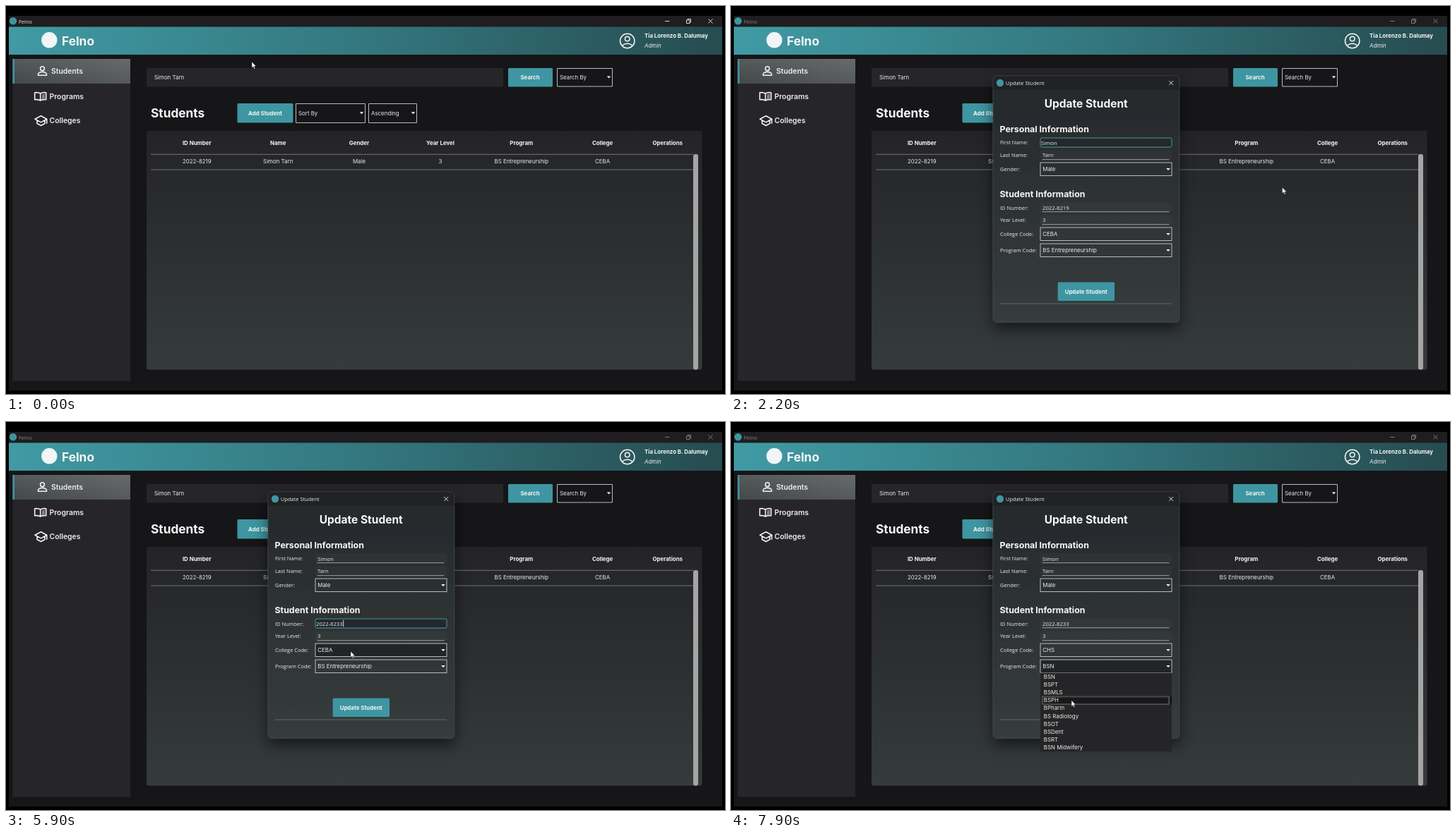
Recreate the animation shown at these times as an HTML page. Size 1018 px wide and 550 px high, loop 8000 ms.

```html
<!DOCTYPE html>
<html lang="en">
<head>
<meta charset="utf-8">
<title>Student records</title>
<style>
html, body { margin: 0; width: 100%; height: 100%; overflow: hidden; background: #000; }
svg { display: block; width: 1018px; height: 550px; }
text { font: 7.9px Inter, sans-serif; fill: #ececec; white-space: pre; }
.ui text, text.ui { font: 7.45px "Open Sans", "Noto Sans", sans-serif; }
.edit text { font: 7.7px "Open Sans", "Noto Sans", sans-serif; }
.bold text, text.bold { font-weight: 700; fill: #f4f4f4; }
.mid text, text.mid { text-anchor: middle; }
.nav text { font-size: 10.4px; font-weight: 600; }
text.h1 { font-size: 17.3px; font-weight: 700; fill: #f6f6f6; }
text.h2 { font-size: 15.5px; font-weight: 700; fill: #f6f6f6; }
text.h3 { font-size: 12.4px; font-weight: 700; fill: #f6f6f6; }
.icon { fill: none; stroke: #f0f0f0; stroke-width: 1.6; stroke-linejoin: round; }
.box { fill: none; stroke: #b9bcbc; stroke-width: 1; }
.teal { fill: #3d96a1; }
.focus rect { fill: #25282a; stroke: #3f97a2; }
.caret { fill: #fff; }
.hover { fill: #232426; }

/* Every animation shares one 8 s clock. */
.dim, .dialog, .first, .firstText, .firstCaret, .year, .id, .idText, .idCaret,
.one, .nine, .three, .last, .before, .after, .hoverA, .hoverB, .listA, .listB,
.rollA, .rollB, .pickA, .pickB, .cursor, .arrow, .beam {
  animation: 8s step-end infinite;
}
.dim { animation-name: dim; }
@keyframes dim { 0% { opacity: 1 } 18.13%, 100% { opacity: .5 } }

.dialog { animation-name: open; animation-timing-function: linear; transform-origin: 502.7px 274px; }
@keyframes open {
  0%, 18.13% { opacity: 0; transform: scale(.9); animation-timing-function: ease-out }
  19.5% { opacity: 1; transform: scale(.972); animation-timing-function: ease-out }
  21.25%, 100% { opacity: 1; transform: none }
}

.first { animation-name: first; }
@keyframes first { 0% { opacity: 1 } 44.38%, 100% { opacity: 0 } }
.firstText { animation-name: firstText; }
@keyframes firstText { 0% { transform: translateX(-2px) } 44.38%, 100% { transform: none } }
.firstCaret { animation-name: firstCaret; }
@keyframes firstCaret { 0% { opacity: 1 } 25.38% { opacity: 0 } 32% { opacity: 1 } 38.63%, 100% { opacity: 0 } }

.year { animation-name: year; }
@keyframes year { 0% { opacity: 0 } 36.9% { opacity: 1 } 40.6% { opacity: 0 } 69.8% { opacity: 1 } 71.3%, 100% { opacity: 0 } }

.id { animation-name: id; }
@keyframes id { 0% { opacity: 0 } 44.38% { opacity: 1 } 75.63%, 100% { opacity: 0 } }
.idText { animation-name: idText; }
@keyframes idText { 0% { transform: none } 44.38% { transform: translateX(-2px) } 75.63%, 100% { transform: none } }
.idCaret { animation-name: idCaret; }
@keyframes idCaret {
  0% { opacity: 0; transform: none }
  44.38% { opacity: 1; transform: none }
  51% { opacity: 0; transform: none }
  57.5% { opacity: 1; transform: translateX(-4.4px) }
  60% { opacity: 1; transform: translateX(-8.8px) }
  65.63% { opacity: 1; transform: translateX(-4.4px) }
  67.5% { opacity: 1; transform: none }
  74.13%, 100% { opacity: 0; transform: none }
}
.nine { animation-name: nine; }
@keyframes nine { 0% { fill-opacity: 1 } 57.5%, 100% { fill-opacity: 0 } }
.one { animation-name: one; }
@keyframes one { 0% { fill-opacity: 1 } 60%, 100% { fill-opacity: 0 } }
.three { animation-name: three; }
@keyframes three { 0% { fill-opacity: 0 } 65.63%, 100% { fill-opacity: 1 } }
.last { animation-name: last; }
@keyframes last { 0% { fill-opacity: 0 } 67.5%, 100% { fill-opacity: 1 } }

.before { animation-name: before; }
@keyframes before { 0% { opacity: 1 } 81.88%, 100% { opacity: 0 } }
.after { animation-name: after; }
@keyframes after { 0% { opacity: 0 } 81.88%, 100% { opacity: 1 } }

.hoverA { animation-name: hoverA; }
@keyframes hoverA { 0% { opacity: 0 } 32.5% { opacity: 1 } 35% { opacity: 0 } 72% { opacity: 1 } 82.5%, 100% { opacity: 0 } }
.hoverB { animation-name: hoverB; }
@keyframes hoverB { 0% { opacity: 0 } 86% { opacity: 1 } 100% { opacity: 1 } }

.listA { animation-name: listA; }
@keyframes listA { 0% { opacity: 0 } 75.63% { opacity: 1 } 81.88%, 100% { opacity: 0 } }
.rollA { animation-name: rollA; animation-timing-function: linear; }
@keyframes rollA { 0%, 75.63% { transform: translateY(-79px) } 77.5%, 100% { transform: none } }
.pickA { animation-name: pickA; }
@keyframes pickA {
  0% { transform: none } 78.1% { transform: translateY(11.17px) }
  78.9% { transform: translateY(22.34px) } 79.8%, 100% { transform: translateY(33.5px) }
}
.listB { animation-name: listB; }
@keyframes listB { 0% { opacity: 0 } 89.56%, 100% { opacity: 1 } }
.rollB { animation-name: rollB; animation-timing-function: linear; }
@keyframes rollB { 0%, 89.56% { transform: translateY(-111.5px) } 91.44%, 100% { transform: none } }
.pickB { animation-name: pickB; }
@keyframes pickB {
  0% { transform: none } 93.2% { transform: translateY(11.17px) }
  94.5% { transform: translateY(22.34px) } 96%, 100% { transform: translateY(33.5px) }
}

.cursor { animation-name: move; animation-timing-function: ease-in-out; }
@keyframes move {
  0%, 1.25% { transform: translate(348px, 79px) }
  11.25%, 23.75% { transform: translate(912px, 216px) }
  33.1% { transform: translate(520px, 338px) }
  38.75% { transform: translate(476px, 302px) }
  43.75%, 68.75% { transform: translate(500px, 287px) }
  73.1%, 75.6% { transform: translate(488px, 325px) }
  80.6%, 82.5% { transform: translate(488px, 372px) }
  87.5% { transform: translate(487px, 347px) }
  90% { transform: translate(487px, 352px) }
  97.5%, 100% { transform: translate(482px, 394.5px) }
}
.arrow { animation-name: arrow; }
@keyframes arrow { 0% { opacity: 1 } 36.25% { opacity: 0 } 71.3%, 100% { opacity: 1 } }
.beam { animation-name: beam; }
@keyframes beam { 0% { opacity: 0 } 36.25% { opacity: 1 } 71.3%, 100% { opacity: 0 } }
</style>
</head>
<body>
<svg viewBox="0 0 1018 550" xmlns="http://www.w3.org/2000/svg">
  <defs>
    <linearGradient id="bar"><stop stop-color="#409aa4"/><stop offset=".5" stop-color="#34777f"/><stop offset="1" stop-color="#264c50"/></linearGradient>
    <linearGradient id="active" x1="0" y1="1" x2="1" y2="0"><stop stop-color="#434849"/><stop offset="1" stop-color="#676b6b"/></linearGradient>
    <linearGradient id="panel" x2="0" y2="1"><stop stop-color="#242427"/><stop offset="1" stop-color="#353b3b"/></linearGradient>
    <linearGradient id="sheet" x2="0" y2="1"><stop stop-color="#25282a"/><stop offset="1" stop-color="#363c3c"/></linearGradient>
    <filter id="shadow" x="-20%" y="-20%" width="140%" height="145%"><feDropShadow dx="0" dy="9" stdDeviation="10" flood-opacity=".55"/></filter>
    <clipPath id="clipA"><path d="M430 333h200v90h-200z"/></clipPath>
    <clipPath id="clipB"><path d="M430 355.5h200v120h-200z"/></clipPath>
    <path id="drop" d="M-2.8-1.4h5.6L0 1.6z" fill="#f4f4f4"/>
    <g id="field">
      <rect width="186.5" height="13.5" rx="2" fill="#fff" fill-opacity=".025"/>
      <path d="M3 13.2h180" stroke="#9da0a0" stroke-width="1"/>
    </g>
    <g id="combo"><rect class="box" width="186" height="18.5"/><use href="#drop" x="181" y="9.4"/></g>
    <g id="pick">
      <rect width="179" height="10.6" fill="#19191b" stroke="#8a8a8a" stroke-width=".8"/>
      <path d="M181 0h2v10.6h-2z" fill="#111"/>
    </g>
  </defs>

  <!-- window -->
  <rect width="1018" height="550"/>
  <path d="M4 14h1010v531H4z" fill="#161518"/>
  <path d="M4 14h1010v16H4z" fill="#1f1d20"/>
  <circle cx="10" cy="21.3" r="5.2" class="teal"/>
  <g class="dim ui">
    <text x="18" y="24.5">Felno</text>
    <path d="M933 21.5h6.5M963.5 20h4.5v4.500h-4.500zM965 20v-1.500h4.500v4.500h-1.500M994.500 18.500l6 6m0-6l-6 6" fill="none" stroke="#eee" stroke-width=".9"/>
  </g>
  <path d="M4 29.500h1010V69H4z" fill="url(#bar)"/>
  <circle cx="61.300" cy="48.300" r="11.200" fill="#f2f5f5"/>
  <text class="h1" x="79" y="56">Felno</text>
  <g class="icon" stroke-width="2">
    <circle cx="879.700" cy="49.500" r="10.200"/>
    <circle cx="879.700" cy="46.500" r="3.300"/>
    <path d="M872.700 56.500c3-4.300 11-4.300 14 0"/>
  </g>
  <text class="bold" x="904" y="45.300">Tia Lorenzo B. Dalumay</text>
  <text x="904" y="58.600" style="font-style:italic">Admin</text>

  <!-- sidebar -->
  <path d="M9.500 75H176v456.500H9.500z" fill="#262629"/>
  <path d="M9.500 75H176v35H9.500z" fill="url(#active)"/>
  <path d="M9.500 75h2.500v35h-2.500z" class="teal"/>
  <g class="icon">
    <circle cx="51.500" cy="88.700" r="2.900"/>
    <path d="M45.500 98.200v-1.400c0-2.200 3.500-3.400 6-3.400s6 1.200 6 3.400v1.400z"/>
    <path d="M48.700 124c-2-1.300-5-1.600-8-1.200v10c3-.4 6 0 8 1.200 2-1.200 5-1.600 8-1.200v-10c-3-.4-6-.1-8 1.200zv10"/>
    <path d="M51 126.300l4-.6M51 128.500l4-.6M51 130.700l4-.6" stroke-width="1"/>
    <path d="M41 160.300l8.500-4.600 8.200 4.600-8.200 4.600zM44 162.200v4.300l5.500 3 5.500-3v-4.300M57.700 160.300v6.500"/>
  </g>
  <g class="nav">
    <text x="64" y="96.300">Students</text>
    <text x="61.500" y="131.700">Programs</text>
    <text x="61.500" y="166.400">Colleges</text>
  </g>

  <!-- toolbar -->
  <path d="M199 88h505v26.500H199z" fill="#262629"/>
  <text x="210" y="104.200">Simon Tarn</text>
  <rect x="711" y="88" width="63" height="26.500" rx="1.500" class="teal"/>
  <rect x="327.500" y="138" width="79" height="27.500" rx="1.500" class="teal"/>
  <g class="bold mid">
    <text x="742" y="104.200">Search</text>
    <text x="367" y="155">Add Student</text>
  </g>
  <g class="box">
    <path d="M780.500 88.500h78v25.500h-78zM410.500 138.500h98v27h-98zM513.500 138.500h68v27h-68z"/>
  </g>
  <text x="784" y="104.200">Search By</text>
  <text x="414" y="155">Sort By</text>
  <text x="517" y="155">Ascending</text>
  <use href="#drop" x="853.500" y="101"/>
  <use href="#drop" x="503.500" y="151.700"/>
  <use href="#drop" x="576.500" y="151.700"/>
  <text class="h1" x="205" y="158.300">Students</text>

  <!-- table -->
  <rect x="199" y="177" width="786.500" height="338.500" rx="3" fill="url(#panel)"/>
  <g class="bold mid">
    <text x="270.300" y="196.500">ID Number</text>
    <text x="385.200" y="196.500">Name</text>
    <text x="500" y="196.500">Gender</text>
    <text x="615" y="196.500">Year Level</text>
    <text x="729.800" y="196.500">Program</text>
    <text x="844.600" y="196.500">College</text>
    <text x="936.700" y="196.500">Operations</text>
  </g>
  <path d="M205 210.300h768M205 232h768" stroke="#717474"/>
  <g class="mid">
    <text x="270.300" y="222.600">2022-8219</text>
    <text x="385.200" y="222.600">Simon Tarn</text>
    <text x="500" y="222.600">Male</text>
    <text x="615" y="222.600">3</text>
    <text x="729.800" y="222.600">BS Entrepreneurship</text>
    <text x="844.600" y="222.600">CEBA</text>
  </g>
  <rect x="973" y="210" width="7" height="305.500" rx="3" fill="#a5a5a5"/>

  <!-- dialog -->
  <g class="dialog">
    <rect x="371" y="99" width="263.700" height="349.500" rx="5" fill="url(#sheet)" stroke="#454949" stroke-width=".8" filter="url(#shadow)"/>
    <path d="M371.400 119v-15a4.600 4.600 0 0 1 4.600-4.600h253.700a4.600 4.600 0 0 1 4.600 4.600v15z" fill="#212224"/>
    <circle cx="381" cy="109" r="5.200" class="teal"/>
    <path d="M620.200 106l6 6m0-6l-6 6" stroke="#eee" stroke-width=".9"/>
    <text class="h2 mid" x="502.700" y="144">Update Student</text>
    <text class="h3" x="380.500" y="179">Personal Information</text>
    <text class="h3" x="380.500" y="271.300">Student Information</text>
    <g class="ui">
      <text x="389" y="112">Update Student</text>
      <text x="381" y="196.400">First Name:</text>
      <text x="381" y="214.300">Last Name:</text>
      <text x="381" y="234">Gender:</text>
      <text x="381" y="288.500">ID Number:</text>
      <text x="381" y="306.300">Year Level:</text>
      <text x="381" y="326.400">College Code:</text>
      <text x="381" y="349">Program Code:</text>
    </g>

    <use href="#field" x="437.500" y="186.500"/>
    <use href="#field" x="437.500" y="204.500"/>
    <use href="#field" x="437.500" y="278.500"/>
    <use href="#field" x="437.500" y="296.500"/>
    <rect class="year" x="437.500" y="296.500" width="186.500" height="13" rx="2" fill="#fff" fill-opacity=".05"/>
    <g class="focus">
      <rect class="first" x="438" y="187" width="186" height="13" rx="2"/>
      <rect class="id" x="438" y="279" width="186" height="13" rx="2"/>
    </g>
    <g class="edit">
      <text class="firstText" x="441" y="196.500">Simon</text>
      <text x="441" y="214.400">Tarn</text>
      <text x="441" y="306.400">3</text>
      <g class="idText">
        <text x="441" y="288.500">2022-82<tspan class="one">1</tspan><tspan class="nine">9</tspan></text>
        <text x="441" y="288.500"><tspan fill-opacity="0">2022-82</tspan><tspan class="three">3</tspan><tspan class="last">3</tspan></text>
      </g>
    </g>
    <rect class="caret firstCaret" x="462" y="189" width=".8" height="9.500"/>
    <rect class="caret idCaret" x="477.300" y="280.800" width=".8" height="9.500"/>

    <rect class="hover hoverA" x="438" y="314" width="186" height="18.500"/>
    <rect class="hover hoverB" x="438" y="337" width="186" height="18.500"/>
    <use href="#combo" x="438" y="222"/>
    <use href="#combo" x="438" y="314"/>
    <use href="#combo" x="438" y="337"/>
    <text x="441.300" y="234.300">Male</text>
    <g class="before">
      <text x="441.300" y="326.400">CEBA</text>
      <text x="441.300" y="349.200">BS Entrepreneurship</text>
    </g>
    <g class="after">
      <text x="441.300" y="326.400">CHS</text>
      <text x="441.300" y="349.200">BSN</text>
    </g>

    <rect x="462.700" y="391.500" width="80.300" height="26.500" rx="1.500" class="teal"/>
    <text class="bold mid" x="502.700" y="407.600">Update Student</text>
    <path d="M381 422h243" stroke="#557478" stroke-width=".9"/>
  </g>

  <!-- drop-down lists -->
  <g clip-path="url(#clipA)"><g class="listA"><g class="rollA">
    <path d="M438 333h186v79H438z" fill="#252527"/>
    <g class="pickA"><use href="#pick" x="441" y="333.400"/></g>
    <g id="colleges"></g>
  </g></g></g>
  <g clip-path="url(#clipB)"><g class="listB"><g class="rollB">
    <path d="M438 355.500h186V467H438z" fill="#252527"/>
    <g class="pickB"><use href="#pick" x="441" y="355.900"/></g>
    <g id="programs"></g>
  </g></g></g>

  <g class="cursor">
    <path class="arrow" d="M0 0v8.800l2-1.900 1.500 3.300 1.400-.6-1.500-3.200h2.800z" fill="#fff" stroke="#111" stroke-width=".5"/>
    <path class="beam" d="M-2.600-5.200h1.800q.8 0 .8.800q0-.8.800-.8h1.800M-2.600 5.200h1.800q.8 0 .8-.8q0 .8.800.8h1.800M0-4.500v9" fill="none" stroke="#e8e8e8"/>
  </g>
</svg>
<script>
const fill = (id, top, names) => {
  document.getElementById(id).innerHTML = names.map((name, i) =>
    `<text x="442.800" y="${top + 8.2 + 11.17 * i}">${name}</text>`).join("");
};
fill("colleges", 333, ["CEBA", "CCS", "CSM", "CHS", "COE", "CED", "CASS"]);
fill("programs", 355.5, ["BSN", "BSPT", "BSMLS", "BSPH", "BPharm", "BS Radiology", "BSOT", "BSDent", "BSRT", "BSN Midwifery"]);
</script>
</body>
</html>
```
